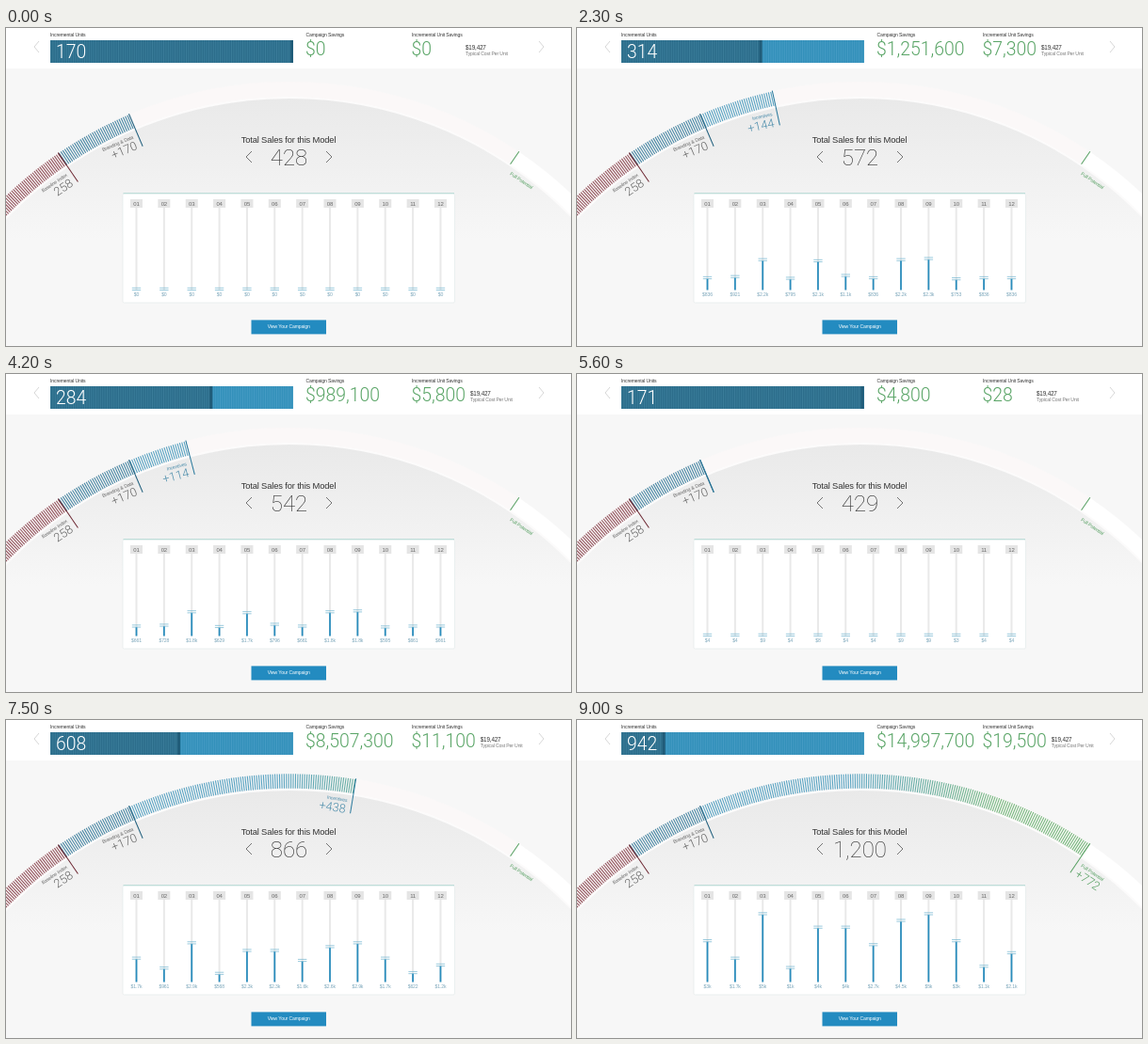
An HTML page that plays this animation: 600x338 px, repeating every 9.1 s.

```html
<!DOCTYPE html>
<html lang="en">
<head>
<meta charset="utf-8">
<title>Sales model</title>
<style>
html, body { margin: 0; width: 100%; height: 100%; overflow: hidden; background: #f7f7f7; }
svg { display: block; width: 600px; height: 338px; }
text { font: 5.1px "Liberation Sans", Arial, sans-serif; letter-spacing: -.025em; fill: #333; }
.num { font-family: Roboto, "Liberation Sans", sans-serif; font-weight: 300; font-size: 19.4px; letter-spacing: 0; }
.thin { font-weight: 100; }
.green { fill: #5aa567; }
.mid { text-anchor: middle; }
.end { text-anchor: end; }
.chevron { fill: none; stroke: #555; stroke-width: .8; }
.pale { stroke: #ccc; }
.band { fill: none; stroke-width: 16; }
.stripes { stroke-width: 15.4; stroke-dasharray: 1.1 1.3; }
.mark text { fill: #666; }
.mark .num { font-size: 12.8px; }
</style>
</head>
<body>
<svg viewBox="0 0 600 338">
  <defs>
    <linearGradient id="dome" gradientUnits="userSpaceOnUse" x1="0" y1="73" x2="0" y2="225">
      <stop stop-color="#e9e9e9"/><stop offset="1" stop-color="#f7f7f7"/>
    </linearGradient>
    <linearGradient id="mix" gradientUnits="userSpaceOnUse" x1="290" y1="0" x2="450" y2="0">
      <stop stop-color="#55a1c0"/><stop offset="1" stop-color="#77b97e"/>
    </linearGradient>
  </defs>

  <rect width="600" height="43" fill="#fff"/>
  <path class="chevron pale" d="M35 14l-5 6 5 6M566 14l5 6-5 6"/>
  <text x="47" y="8.7">Incremental Units</text>
  <text x="318.5" y="8.7">Campaign Savings</text>
  <text x="431" y="8.7">Incremental Unit Savings</text>
  <path d="M47 25H305" stroke="#3390ba" stroke-width="24"/>
  <path d="M47 25H305" stroke="#459bc4" stroke-width="24" stroke-dasharray="1 1.4"/>
  <path id="barBase" stroke="#2c6d8b" stroke-width="24"/>
  <path id="barLines" stroke="#3a7c99" stroke-width="24" stroke-dasharray="1 1.4"/>
  <rect id="barEnd" y="13" width="3" height="24" fill="#205c79"/>
  <text id="units" class="num" x="53" y="32.4" style="fill:#fff"></text>
  <text id="savings" class="num green" x="318" y="29.2"></text>
  <text id="unitSavings" class="num green" x="430.5" y="29.2"></text>
  <g id="cost">
    <text y="23" style="font-size:6.3px">$19,427</text>
    <text y="29" style="fill:#777">Typical Cost Per Unit</text>
  </g>

  <circle cx="301" cy="492" r="418.5" fill="url(#dome)" stroke="#fcfbfb" stroke-width="3"/>
  <g id="gauge"></g>

  <text class="mid" x="300" y="122" style="font-size:9.4px;letter-spacing:-.0165em">Total Sales for this Model</text>
  <text id="total" class="num thin mid" x="300.5" y="145.5" style="font-size:24px"></text>
  <path class="chevron" d="M261 131l-6 6 6 6M340 131l6 6-6 6"/>

  <rect x="124" y="176" width="352.5" height="116" rx="1.5" fill="#fff" stroke="#e2eaea" stroke-width=".7"/>
  <path d="M124.5 175.7H476" stroke="#9dd0c9" stroke-width=".7"/>
  <g id="sliders"></g>

  <rect x="260.5" y="310.4" width="79.5" height="15" fill="#238bc0"/>
  <text class="mid" x="300.2" y="319.3" style="fill:#fff">View Your Campaign</text>
</svg>
<script>
const $ = id => document.getElementById(id);
const add = (parent, tag, attrs, label = '') => {
  const node = document.createElementNS('http://www.w3.org/2000/svg', tag);
  set(node, attrs).textContent = label;
  return parent.appendChild(node);
};
function set(node, attrs) {
  for (const key in attrs) node.setAttribute(key, attrs[key]);
  return node;
}
const comma = n => n.toLocaleString('en-US');

// Gauge: angles in degrees from the vertical
const CX = 301, CY = 492, R = 427;
const BASE = -34.35, BRAND = -23.05, FULL = 34.05, MAX = 772;
const gauge = $('gauge');
const point = deg => {
  const a = deg * Math.PI / 180;
  return (CX + R * Math.sin(a)).toFixed(2) + ' ' + (CY - R * Math.cos(a)).toFixed(2);
};
const arc = (from, to) => `M${point(from)}A${R} ${R} 0 0 1 ${point(to)}`;
const band = (from, to, stroke, cls = '') =>
  add(gauge, 'path', { class: 'band ' + cls, d: arc(from, to), stroke });
const turn = deg => ({ transform: `rotate(${deg} ${CX} ${CY})` });

function mark(deg, label, value, color, side = -1) {
  const g = add(gauge, 'g', { class: 'mark', ...turn(deg) });
  const anchor = side < 0 ? 'end' : '', x = CX + 5.5 * side;
  const tick = add(g, 'path', { d: 'M301 56.5V94', stroke: color });
  const name = add(g, 'text', { class: anchor, x, y: 82.5 }, label);
  const number = add(g, 'text', { class: 'num ' + anchor, x, y: 94.5 }, value);
  return { g, tick, name, number };
}

band(-48, BRAND, '#f7f4f4');
band(BRAND, FULL, '#fbf8f8');
band(FULL, 48, '#fff');
band(-48, BASE, '#965861', 'stripes');
band(BASE, BRAND, '#4a8aa6', 'stripes');
const fill = band(BRAND, BRAND, 'url(#mix)', 'stripes');
mark(BASE, 'Baseline Index', '258', '#6b2530');
mark(BRAND, 'Branding & Data', '+170', '#205f7d');
const gain = mark(BRAND, 'Incentives', '', '#26779b');
const full = mark(FULL, 'Full Potential', '+' + MAX, '#559f60', 1);
full.name.style.fill = full.number.style.fill = '#559f60';
gain.name.style.fill = gain.number.style.fill = '#4c8dab';

// Monthly sliders
const BOTTOM = 278.5;
const sliders = Array.from({ length: 12 }, (_, i) => {
  const x = 138.5 + 29.36 * i, g = $('sliders');
  add(g, 'rect', { x: x - 6.5, y: 182, width: 13, height: 9, fill: '#e5e5e5' });
  add(g, 'text', { class: 'mid', x, y: 188.7, style: 'font-size:6px;fill:#666' }, String(i + 1).padStart(2, '0'));
  add(g, 'path', { d: `M${x} 191V${BOTTOM}`, stroke: '#e9e9e9', 'stroke-width': 2 });
  return {
    x,
    bar: add(g, 'path', { stroke: '#2a8dbd', 'stroke-width': 1.8 }),
    handle: add(g, 'path', { fill: '#d9ebf2', stroke: '#6fb3cf', 'stroke-width': .7 }),
    label: add(g, 'text', { class: 'mid', x, y: 285.3, style: 'fill:#7ba6ba' })
  };
});
const money = v => {
  const n = Math.ceil(v);
  return '$' + (n < 1000 ? n : Math.ceil(n / 100) / 10 + 'k');
};

const plans = [
  { peak: 171.4, savings: 1492860, unit: 8700,
    months: [997, 1098, 2600, 948, 2500, 1200, 997, 2600, 2700, 898, 997, 997] },
  { peak: MAX, savings: 19427 * MAX, unit: 19427,
    months: [2990, 1693, 5000, 1000, 4000, 4000, 2700, 4500, 5000, 2990, 1095, 2100] }
];
const ease = (t, start, length) => {
  const p = Math.min(1, Math.max(0, (t - start) / length));
  return (1 - Math.cos(Math.PI * p)) / 2;
};
const ceil100 = n => Math.ceil(n / 100) * 100;

function draw(t) {
  const second = t >= 5700, plan = plans[+second];
  const k = second ? ease(t, 5718.185, 3281.815) : ease(t, 0, 3122.535) - ease(t, 3229.814, 2458.52);
  const exact = k * plan.peak, n = Math.round(exact);

  $('units').textContent = 170 + n;
  $('total').textContent = comma(428 + n);
  $('savings').textContent = '$' + comma(ceil100(k * plan.savings));
  const unit = k * plan.unit;
  $('unitSavings').textContent = '$' + comma(unit < 100 ? Math.ceil(unit) : ceil100(unit));
  const width = $('unitSavings').getComputedTextLength();
  set($('cost'), { transform: `translate(${435.5 + Math.max(52.5, width)})` });

  const edge = 47 + 258 * (1 - exact / (170 + plan.peak));
  for (const id of ['barBase', 'barLines']) set($(id), { d: `M47 25H${edge}` });
  set($('barEnd'), { x: edge - 3 });

  const deg = BRAND + (FULL - BRAND) * exact / MAX;
  const done = n === MAX;
  set(fill, { d: arc(BRAND, deg) });
  set(gain.g, turn(deg));
  gain.g.style.display = n > 0 && !done ? '' : 'none';
  gain.name.style.display = gain.number.style.display = n > 20 ? '' : 'none';
  gain.number.textContent = '+' + n;
  full.number.style.display = done ? '' : 'none';
  set(full.tick, { d: done ? 'M301 56.5V94' : 'M301 56.5V73' });

  sliders.forEach(({ x, bar, handle, label }, i) => {
    const value = k * plan.months[i], y = BOTTOM - value * .0143;
    set(bar, { d: `M${x} ${y}V${BOTTOM}` });
    set(handle, { d: `M${x - 4.7} ${y - 2.2}h9.4m0 2.2h-9.4` });
    label.textContent = money(value);
  });
}

const start = performance.now();
function frame() {
  const t = (performance.now() - start) % 9100;
  draw(Math.floor(t / 100) * 100);
  requestAnimationFrame(frame);
}
frame();
</script>
</body>
</html>
```
